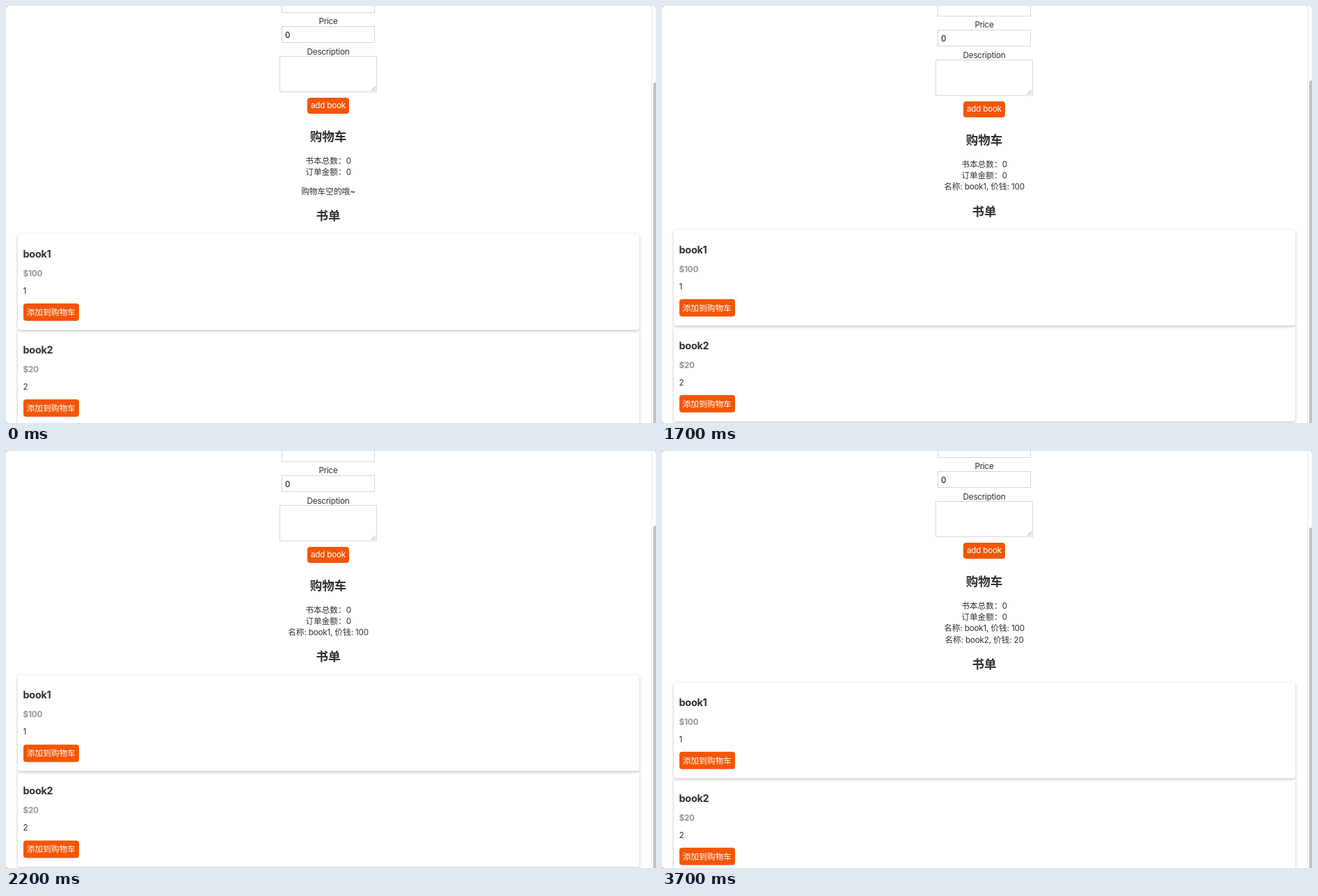
An HTML page for the animation above (4.6 s loop, 934 px wide and 600 px high).

```html
<!DOCTYPE html>
<html lang="zh-CN">
<head>
<meta charset="utf-8">
<title>书单</title>
<style>
html, body { margin: 0; width: 100%; height: 100%; overflow: hidden; background: #777; }
#stage {
  position: relative; width: 934px; height: 600px; overflow: hidden;
  background: #fff; border-radius: 3px; color: #303030;
  font: 11.7px/16px Inter, "Noto Sans CJK SC", "Noto Sans CJK", sans-serif;
}
#stage div { position: absolute; box-sizing: border-box; }
#stage i { font-style: normal; letter-spacing: -.018em; }
.layer { left: 0; top: 0; width: 926px; height: 600px; }
.text { height: 16px; white-space: nowrap; }
.mid { left: 363px; width: 200px; text-align: center; }
.h2 { font-size: 17.55px; font-weight: 700; }
.h3 { font-size: 14.4px; font-weight: 700; }
.price { font-weight: 700; color: #959595; }
.field { border: 1px solid #d6d6d6; background: #fff; }
.button {
  border-radius: 4px; background: #f25606; color: #fff;
  display: flex; align-items: center; justify-content: center; white-space: nowrap;
}
.button.off { background: #e1e1e1; color: #fafafa; }
.card {
  left: 17px; width: 892.5px; height: 138px; border-radius: 4px;
  background: #fff; box-shadow: 0 1.5px 4px rgba(0, 0, 0, .25);
}
#track { left: 927px; top: 0; width: 7px; height: 600px; background: #fcfcfc; border-left: 1px solid #ebebeb; }
#thumb { left: 930px; width: 8px; height: 510px; border-radius: 4px; background: #c2c2c2; }
svg { position: absolute; right: 0; bottom: 0; }
</style>
</head>
<body>
<div id="stage">
  <div id="form" class="layer"></div>
  <div id="list" class="layer"></div>
  <div id="track"></div>
  <div id="thumb"></div>
</div>
<script>
const $ = id => document.getElementById(id);
const LOOP = 4600;
const LINE = 16.3;

function add(parent, cls, html, box) {
  const el = document.createElement('div');
  el.className = cls;
  el.innerHTML = html.replace(/^[^<]+$/, s => s.replace(/[ -~]+/g, '<i>$&</i>'));
  for (const k in box) el.style[k] = box[k] + 'px';
  parent.append(el);
  return el;
}
const label = (parent, y, text, cls = '') => add(parent, 'text mid ' + cls, text, { top: y - 8 });
const rect = (left, top, width, height) => ({ left, top, width, height });

const form = $('form'), list = $('list');
add(form, 'field', '', rect(396, -15, 134, 24.5));
label(form, 22.3, 'Price');
add(form, 'field', '', rect(396, 28.7, 134, 24.5));
add(form, 'text', '0', { left: 401, top: 34 }).style.color = '#000';
label(form, 66, 'Description');
add(form, 'field', '<svg width="8" height="8" stroke="#777" stroke-width=".8"><path d="M1 7L7 1M4.5 7L7 4.5"/></svg>',
  rect(393, 72.3, 140, 51.3));
add(form, 'button', 'add book', rect(433, 131.5, 60, 23));
label(form, 187.5, '购物车', 'h2');
label(form, 222.7, '书本总数：0');
label(form, 222.7 + LINE, '订单金额：0');
const empty = label(form, 267, '购物车空的哦~');

const books = [['book1', 100], ['book2', 20]];
const items = books.map(([name, price], i) =>
  label(form, 222.7 + LINE * (i + 2), `名称: ${name}, 价钱: ${price}`));

label(list, 301.5, '书单', 'h2');
const buttons = books.map(([name, price], i) => {
  const card = add(list, 'card', '', { top: 328 + 138.2 * i });
  card.style.zIndex = 2 - i;
  const line = (y, text, cls) => add(card, 'text ' + cls, text, { left: 7.5, top: y - 8 });
  line(28.8, name, 'h3');
  line(56.7, '$' + price, 'price');
  line(81.5, String(i + 1), '');
  return add(card, 'button', '添加到购物车', rect(7.5, 100, 80.5, 25));
});

// time, items in cart, pressed button, page offset
const steps = [
  [0, 0, -1, 0],
  [800, 0, 0, 0],
  [1000, 1, -1, 5.9],
  [1700, 1, -1, 5.2],
  [1800, 1, -1, 3.2],
  [1900, 1, -1, 2.2],
  [2000, 1, -1, 3.7],
  [2100, 1, -1, 5.2],
  [2200, 1, -1, 5.9],
  [2600, 1, 1, 5.9],
  [2900, 2, -1, 0]
];
const listShift = [0, -11.5, 4.8];
const thumbTop = [109.5, 107.3, 109.5];

let shown;
function draw(step) {
  const [, count, pressed, offset] = step;
  empty.hidden = count > 0;
  items.forEach((el, i) => el.hidden = i >= count);
  buttons.forEach((el, i) => el.classList.toggle('off', i === pressed));
  form.style.transform = `translateY(${offset}px)`;
  list.style.transform = `translateY(${offset + listShift[count]}px)`;
  $('thumb').style.top = thumbTop[count] + 'px';
}

const start = performance.now();
function tick() {
  const t = (performance.now() - start) % LOOP;
  const step = steps.filter(s => s[0] <= t).pop();
  if (step !== shown) draw(shown = step);
  requestAnimationFrame(tick);
}
tick();
</script>
</body>
</html>
```
